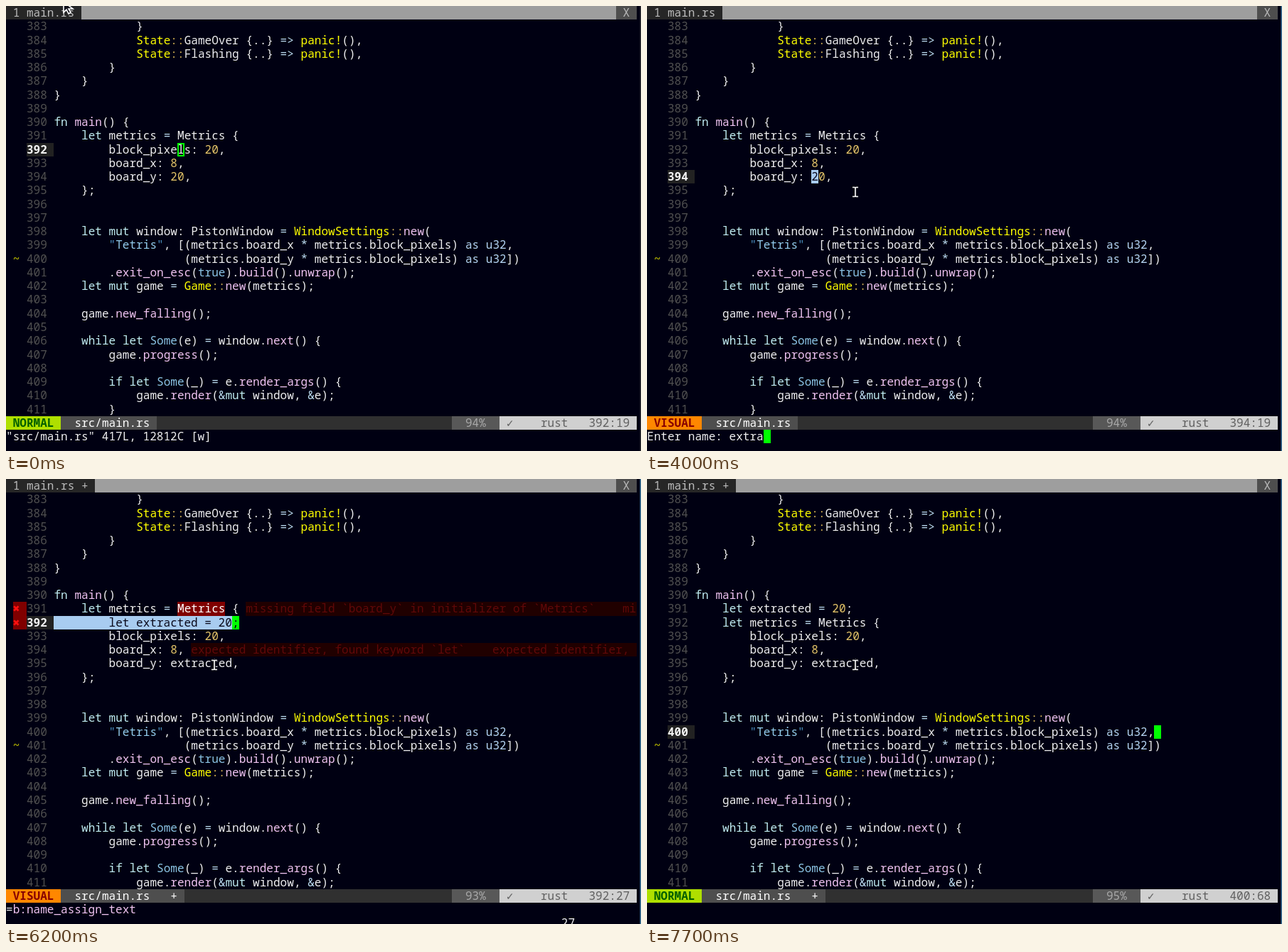
These frames come from a looping animation (893 px wide and 627 px high, 8 s). An HTML page with a canvas:

```html
<!DOCTYPE html>
<html>
<head>
<meta charset="utf-8">
<style>
html, body { margin: 0; width: 100%; height: 100%; overflow: hidden; background: #000012; }
canvas { display: block; }
</style>
</head>
<body>
<canvas id="stage" width="893" height="627"></canvas>
<script>
const ctx = document.getElementById('stage').getContext('2d');
const LOOP = 8000, CW = 9.64, CH = 19.26, COLS = 92, FIRST = 383, ROWS = 29;
const FONT = '16.06px "Noto Sans Mono", "DejaVu Sans Mono", monospace';
const BG = '#000012', FG = '#eeeeee', GREEN = '#00ff00', SELECT = '#a8ccf0', PINK = '#f0c4f0';

const HEAD = `            }
            State::GameOver {..} => panic!(),
            State::Flashing {..} => panic!(),
        }
    }
}

fn main() {
    let metrics = Metrics {
        block_pixels: 20,
        board_x: 8,`.split('\n');
const TAIL = `    };


    let mut window: PistonWindow = WindowSettings::new(
        "Tetris", [(metrics.board_x * metrics.block_pixels) as u32,
                   (metrics.board_y * metrics.block_pixels) as u32])
        .exit_on_esc(true).build().unwrap();
    let mut game = Game::new(metrics);

    game.new_falling();

    while let Some(e) = window.next() {
        game.progress();

        if let Some(_) = e.render_args() {
            game.render(&mut window, &e);
        }`.split('\n');

const RULES = [
  [/\s+/y, null],
  [/"/y, '#4a90c0'],
  [/Tetris\b/y, '#94cdec'],
  [/(State|WindowSettings|Game)\b|panic!/y, '#ffff00'],
  [/::/y, '#c8a850'],
  [/(fn|let|mut|while|if)\b/y, '#c0ecf0'],
  [/(as|u32)\b/y, '#b4d4f0'],
  [/(Some|true)\b/y, '#8cc4e4'],
  [/\d+/y, '#e4c468'],
  [/\w+(?=\()/y, PINK],
  [/[=>*&]+/y, '#bcdcf0'],
  [/\w+|./y, FG]
];

const MISSING = 'missing field `board_y` in initializer of `Metrics`';
const EXPECTED = 'expected identifier, found keyword `let`';
const EXPRESSION = '=b:name_assign_text';

// Each entry changes the editor state from its time on.
const EVENTS = [
  [0, { mode: 'NORMAL', line: 392, col: 19, cmd: '"src/main.rs" 417L, 12812C [w]', gutter: 3 }],
  [1000, { focus: true }],
  [1800, { line: 393 }],
  [1900, { line: 394 }],
  [2100, { col: 18 }],
  [2300, { mode: 'VISUAL', sel: [17, 17], count: '1' }],
  [2400, { col: 19, sel: [17, 18], count: '2' }],
  [3200, { cmd: 'Enter name: ', prompt: 12, count: '' }],
  ...[3500, 3700, 3800, 3900, 4000, 4200, 4300, 4400, 4500].map((time, i) =>
    [time, { cmd: 'Enter name: ' + 'extracted'.slice(0, i + 1), prompt: 13 + i }]),
  [4900, { cmd: EXPRESSION, prompt: 0, tabPlus: true }],
  [5000, { prompt: -1, plus: true, insert: 394, indent: 8, col: 27, sel: [0, 26], count: '27' }],
  [5500, { signs: [391, 394], error: 391, notes: [[391, MISSING], [394, EXPECTED]] }],
  [6100, { insert: 393, line: 393, signs: [391, 393] }],
  [6200, { insert: 392, line: 392, signs: [391, 392] }],
  [6300, { insert: 391, line: 391, indent: 4, col: 24, sel: [0, 23], count: '24', gutter: 5,
    signs: [391, 392], error: 392,
    cmd: '[Error] [E0063] ' + MISSING + '  missing `board_y`' }],
  [6700, { mode: 'NORMAL', sel: null, count: '' }],
  [7000, { line: 392, col: 28, gutter: 3, signs: [], notes: [], error: 0, cmd: '' }],
  [7100, { line: 394, col: 20 }],
  [7200, { line: 396, col: 7 }],
  [7300, { line: 398, col: 1 }],
  [7500, { line: 399, col: 56 }],
  [7700, { line: 400, col: 68 }]
];

function stateAt(t) {
  const state = { prompt: -1, signs: [], notes: [], count: '' };
  for (const [time, patch] of EVENTS) if (time <= t) Object.assign(state, patch);
  return state;
}

function documentFor(s) {
  const lines = [...HEAD, `        board_y: ${s.insert ? 'extracted' : '20'},`, ...TAIL];
  if (s.insert) lines.splice(s.insert - FIRST, 0, ' '.repeat(s.indent) + 'let extracted = 20;');
  return lines.slice(0, ROWS);
}

function box(col, row, cols, color) {
  const x = Math.round(col * CW), y = Math.round(row * CH);
  ctx.fillStyle = color;
  ctx.fillRect(x, y, Math.round((col + cols) * CW) - x, Math.round((row + 1) * CH) - y);
}

function text(str, col, row, color, bold) {
  ctx.font = (bold ? 'bold ' : '') + FONT;
  ctx.fillStyle = color;
  ctx.fillText(str, col * CW, row * CH + 15);
}

function codeText(line, col, row) {
  let i = 0;
  while (i < line.length) {
    for (const [rule, color] of RULES) {
      rule.lastIndex = i;
      const hit = rule.exec(line);
      if (!hit) continue;
      if (color) text(hit[0], col + i, row, color);
      i += hit[0].length;
      break;
    }
  }
}

function drawTabs(s) {
  const label = ' 1 main.rs ' + (s.tabPlus ? '+ ' : '');
  box(0, 0, COLS, '#9e9e9e');
  box(0, 0, label.length, '#262626');
  text(label, 0, 0, '#bcbcbc');
  box(89, 0, 3, '#4e4e4e');
  text('X', 90, 0, '#bcbcbc');
}

function drawCursor(s, char, col, row) {
  if (s.focus) {
    box(col, row, 1, GREEN);
    text(char, col, row, BG);
  } else {
    ctx.strokeStyle = GREEN;
    ctx.lineWidth = 2;
    ctx.strokeRect(Math.round(col * CW) + 1, Math.round(row * CH) + 1, 8, 17);
  }
}

function drawCode(s) {
  const lines = documentFor(s), left = s.gutter + 4;
  const warning = s.insert ? 401 : 400;
  lines.forEach((line, i) => {
    const number = FIRST + i, row = i + 1, current = number === s.line;
    if (current) box(s.gutter, row, 4, '#222222');
    text(String(number), s.gutter, row, current ? '#f4f4f4' : '#505050', current);
    if (number === warning) text('~', 1, row, '#a8a800', true);
    if (s.signs.includes(number)) {
      box(1, row, 2, '#800000');
      text('✖', 1, row, '#ff1010');
    }
    codeText(line, left, row);

    if (number === s.error) {
      const at = left + line.indexOf('Metrics');
      box(at, row, 7, '#800000');
      text('Metrics', at, row, '#ffffff');
    }
    if (current && s.sel) {
      const [from, to] = s.sel;
      const end = s.prompt >= 0 ? to : to + 1;
      box(left + from, row, end - from, SELECT);
      text(line.slice(from, end), left + from, row, '#0a0a1c');
    }
    const note = s.notes.find(n => n[0] === number);
    if (note) {
      const at = left + line.length + 1;
      box(at, row, COLS - at, '#200000');
      text(`${note[1]}    ${note[1]}`.slice(0, COLS - at), at, row, '#600808');
    }
    if (current && s.prompt < 0) drawCursor(s, line[s.col - 1] || ' ', left + s.col - 1, row);
  });
}

function drawStatus(s) {
  const row = 30, visual = s.mode === 'VISUAL', total = s.insert ? 418 : 417;
  box(0, row, COLS, '#303030');
  box(0, row, 8, visual ? '#ff8700' : '#afdf00');
  text(s.mode, 1, row, visual ? '#870000' : '#005f00', true);
  box(8, row, s.plus ? 18 : 14, '#4e4e4e');
  text('src/main.rs' + (s.plus ? '   +' : ''), 10, row, '#ffffff');
  box(65, row, 7, '#585858');
  text(Math.floor(s.line * 100 / total) + '%', 67, row, '#a8a8a8');
  box(72, row, 20, '#d0d0d0');
  text('✓', 73, row, '#606060');
  text('rust', 78, row, '#606060');
  text(s.line + ':' + s.col, 85, row, '#606060');
}

function drawCommand(s) {
  const row = 31;
  if (s.cmd === EXPRESSION) {
    text('=', 0, row, FG);
    text(s.cmd.slice(1), 1, row, PINK);
  } else {
    text(s.cmd, 0, row, FG);
  }
  if (s.prompt >= 0) drawCursor(s, s.cmd[s.prompt] || ' ', s.prompt, row);
  text(s.count, 81, row + 1, FG);
}

function outline(path, width, color) {
  ctx.lineWidth = width;
  ctx.strokeStyle = color;
  ctx.stroke(path);
}

const ARROW = new Path2D('M0 0V15L4 11L7 17L10 15L7 10H13Z');
const BEAM = new Path2D('M-4 -6.5H-1L0 -5.5L1 -6.5H4M0 -5.5V5.5M-4 6.5H-1L0 5.5L1 6.5H4');

function drawPointer(t) {
  ctx.save();
  if (t < 1000) {
    ctx.translate(81, -6);
    ctx.fillStyle = '#101018';
    ctx.fill(ARROW);
    outline(ARROW, 1.6, '#ffffff');
  } else {
    const u = Math.min(1, (Math.floor((t - 1000) / 100) + 1) / 5);
    ctx.translate(85 + 208 * u, 2 + 260 * u);
    outline(BEAM, 3.6, '#101018');
    outline(BEAM, 1.6, '#ffffff');
  }
  ctx.restore();
}

function draw(t) {
  const s = stateAt(t);
  ctx.fillStyle = BG;
  ctx.fillRect(0, 0, 893, 627);
  drawTabs(s);
  drawCode(s);
  drawStatus(s);
  drawCommand(s);
  ctx.fillStyle = s.focus ? '#3a7298' : '#2a2a30';
  ctx.fillRect(891.5, 0, 1.5, 627);
  drawPointer(t);
}

function tick() {
  draw(performance.now() % LOOP);
  requestAnimationFrame(tick);
}
tick();
</script>
</body>
</html>
```
